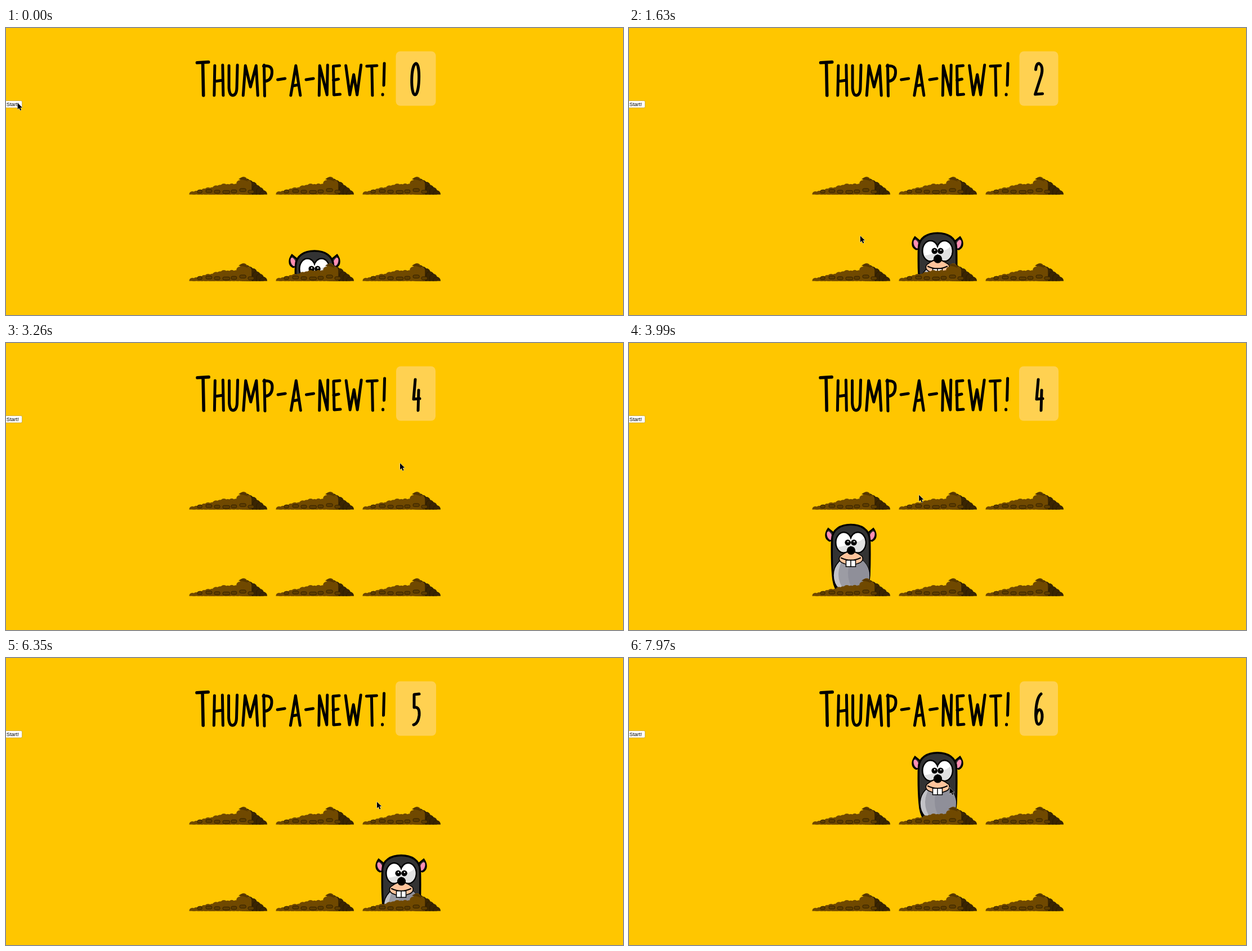
Animation, 1096 px wide and 511 px high, one loop 8 s. Source, as an HTML page:

```html
<!DOCTYPE html>
<html lang="en">
<head>
<meta charset="utf-8">
<title>Thump-a-newt!</title>
<style>
  html, body { margin: 0; width: 100%; height: 100%; overflow: hidden; background: #ffc600; }
  svg { display: block; width: 100%; height: 100%; }
  .lettering { fill: none; stroke: #000; stroke-width: 5; stroke-linecap: round; stroke-linejoin: round; }
  .button { font: 9.3px "Liberation Sans", Arial, sans-serif; }
</style>
</head>
<body>
<svg viewBox="0 0 1096 511">
  <defs>
    <clipPath id="hole"><rect x="-77" y="-34" width="154" height="154"/></clipPath>
    <clipPath id="ground"><rect x="-70" y="-40" width="140" height="40"/></clipPath>
    <clipPath id="belly"><ellipse cx="1" cy="92" rx="32" ry="34"/></clipPath>
    <clipPath id="eyes"><use href="#eye"/><use href="#eye" x="25"/></clipPath>

    <ellipse id="eye" cx="-12.5" cy="33.5" rx="13" ry="17"/>
    <g id="ear">
      <path d="M-40 9C-45 16 -47 26 -38 30.5C-34 31 -32 25 -29 18Z" fill="#333" stroke="#000" stroke-width="3"/>
      <ellipse cx="-37.8" cy="21.5" rx="4" ry="8" transform="rotate(-22 -37.8 21.5)" fill="#ff8fb3"/>
    </g>
    <g id="mole">
      <use href="#ear"/>
      <use href="#ear" transform="scale(-1 1)"/>
      <path d="M-20 123C-28 117 -31 107 -32 92C-34 70 -34 48 -33.5 28C-33 10 -18 1.7 0 1.7C18 1.7 33 10 33.5 28C34 48 34 70 33 92C32 107 29 117 22 123Z" fill="#333" stroke="#000" stroke-width="3.4"/>
      <ellipse cx="1" cy="92" rx="32" ry="34" fill="#c2c2c7" stroke="#000" stroke-width="1.5"/>
      <g clip-path="url(#belly)">
        <ellipse cx="14" cy="90" rx="36" ry="40" fill="#9c9ca4"/>
        <ellipse cx="30" cy="88" rx="35" ry="44" fill="#8f8f99"/>
      </g>
      <g stroke="#000" stroke-width="5"><use href="#eye"/><use href="#eye" x="25"/></g>
      <g clip-path="url(#eyes)">
        <rect x="-27" y="15" width="54" height="38" fill="#fff"/>
        <path d="M-27 42Q-8 40 0 34Q20 34 27 20V54H-27Z" fill="#e2e2e2"/>
      </g>
      <circle cx="-5.3" cy="33.5" r="5.3"/><circle cx="5.5" cy="33.5" r="5.3"/>
      <g fill="#fff"><circle cx="-5" cy="32" r="1.2"/><circle cx="6" cy="32" r="1.2"/></g>
      <path d="M0 49C-10 50 -13 54 -19 58C-23 64 -19 69 -12 71Q0 77 12 71C20 69 23 64 20 58C14 54 10 50 0 49Z" fill="#ffc49c" stroke="#000" stroke-width="1.5"/>
      <path d="M-17 61Q0 69 17 61" fill="none" stroke="#000" stroke-width="2.2" stroke-linecap="round"/>
      <path d="M-8.5 65H0V76.5H-8.5ZM0 65H8.5V76.5H0Z" fill="#fff" stroke="#000" stroke-width="1.5"/>
      <circle cx=".5" cy="47.8" r="7.6"/>
    </g>
    <g id="dirt" clip-path="url(#ground)"></g>
  </defs>

  <rect width="1096" height="511" fill="#ffc600"/>
  <g id="title" class="lettering" role="img" aria-label="Thump-a-newt!"></g>
  <rect id="box" y="41.5" height="97" rx="8" fill="#ffd151"/>
  <path id="digit" class="lettering"/>
  <rect x="-4" y="129.5" width="32.5" height="12.5" rx="2" fill="#fff" stroke="#b89a3a" stroke-width=".7"/>
  <text class="button" x=".8" y="139">Start!</text>
  <g id="holes"></g>
  <path id="cursor" d="M0 0V11.5L2.7 9L4.6 13.4L6.6 12.5L4.7 8.2H8.3Z" stroke="#fff" paint-order="stroke"/>
</svg>
<script>
const LOOP = 8000, STEP = 147.5, SLIDE = 400, REACTION = 100, REACH = 444;
const PITCH = 154, BASELINE = 120;
const $ = id => document.getElementById(id);

function add(parent, tag, attrs) {
  const el = document.createElementNS('http://www.w3.org/2000/svg', tag);
  for (const key in attrs) el.setAttribute(key, attrs[key]);
  return parent.appendChild(el);
}

// Hand lettering: width and pen strokes above the baseline
const glyphs = {
  T: [18, 'M0 -52L18 -53M9 -52L10 0'],
  H: [16, 'M1 -53L0 0M15 -54L16 0M1 -25L15 -27'],
  U: [15, 'M0 -53V-13Q1 0 7 0Q14 -1 14 -15L15 -54'],
  M: [26, 'M0 0L4 -53L13 -15L23 -53L26 0'],
  P: [15, 'M1 -54L2 1M0 -52Q16 -55 15 -40Q14 -26 2 -25'],
  '-': [13, 'M0 -28L13 -30'],
  A: [17, 'M0 0L9 -53L17 0M4 -17L14 -19'],
  N: [15, 'M0 0L1 -53L14 -1L15 -54'],
  E: [12, 'M11 -53L0 -52L1 -1L12 -2M0 -27L9 -29'],
  W: [27, 'M0 -53L7 -1L14 -37L20 -1L27 -54'],
  '!': [3, 'M3 -57L2 -18M0 -2V-1'],
  0: [15, 'M8 -57C-2 -55 -2 -1 6 -1S16 -54 8 -57Z'],
  1: [10, 'M1 -55L6 -57L7 0M1 0H11'],
  2: [13, 'M1 -46Q2 -57 7 -57Q15 -52 11 -36L0 -2L13 -3'],
  3: [16, 'M3 -55L13 -56L7 -33Q15 -30 14 -16Q12 -2 4 -1'],
  4: [14, 'M6 -55L3 -20L14 -21M12 -36L11 0'],
  5: [16, 'M14 -56L5 -55V-32Q15 -34 14 -18Q12 -3 4 -1'],
  6: [12, 'M10 -56C-1 -48 -2 -2 5 -2C14 -2 14 -28 7 -28C3 -27 0 -18 1 -12']
};

let pen = 339;
[...'THUMP-A-NEWT!'].forEach((char, i) => {
  const [width, d] = glyphs[char], scale = i ? 1 : 1.12;
  add($('title'), 'path', { d, transform: `translate(${pen} ${BASELINE}) scale(${scale})` });
  pen += width * scale + 10.2;
});

let seed = 7;
const random = () => (seed = seed * 16807 % 2147483647) / 2147483647;

// Round-topped columns of soil under a skyline
function clumps(from, to, gap, skyline, paint) {
  for (let x = from; x <= to; x += gap) {
    const h = skyline(x) + random() * 2 - 1, r = Math.min(h, 5 + random() * 2.5);
    add($('dirt'), 'rect', { x: x - r, y: -h, width: 2 * r, height: h + r, rx: r, ...paint });
  }
}
clumps(33, 64, 6, x => 30 - 26 * ((x - 30) / 36) ** 1.3, { fill: '#3a2502', stroke: '#241700', 'stroke-width': .7 });
clumps(-63, 36, 7, x => Math.min(19, 5 + .24 * (x + 64)) + 12 * Math.exp(-(((x - 28) / 9) ** 2)), { fill: '#704900' });
for (let x = -54; x < 40; x += 15) {
  const width = 8 + random() * 5;
  add($('dirt'), 'rect', { x, y: -7 - random() * 4, width, height: 5.5, rx: 2.5, fill: '#5e3d00', stroke: '#2e1d00', 'stroke-width': .9 });
}
add($('dirt'), 'path', { d: 'M19 -27Q24 -33 32 -29L36 -23Q29 -27 19 -27Z', fill: '#553600' });

// Holes 0-2 are the top row, 3-5 the bottom row
const moles = Array.from({ length: 6 }, (_, i) => {
  const hole = add($('holes'), 'g', { transform: `translate(${394 + i % 3 * PITCH} ${167 + (i / 3 | 0) * PITCH})` });
  const view = add(hole, 'g', { 'clip-path': 'url(#hole)' });
  const mole = add(view, 'use', { href: '#mole' });
  add(hole, 'use', { href: '#dirt', y: 129.5 });
  return mole;
});

// Each mole comes up, the cursor runs to its aim, and the mole drops, hit or not
const peeps = [
  { hole: 4, up: -121, down: 560, aim: [578, 353], hit: 1 },
  { hole: 3, up: 668, down: 1400, aim: [400, 372], hit: 1 },
  { hole: 4, up: 1450, down: 1950, aim: [552, 345], hit: 1 },
  { hole: 2, up: 2090, down: 2900, aim: [700, 214], hit: 1 },
  { hole: 3, up: 3618, down: 4190, aim: [412, 302] },
  { hole: 2, up: 4190, down: 4980, aim: [600, 225] },
  { hole: 1, up: 4980, down: 5340, aim: [523, 219] },
  { hole: 2, up: 5340, down: 6060, aim: [662, 235], hit: 1 },
  { hole: 5, up: 6138, down: 6720, aim: [640, 385] },
  { hole: 4, up: 6720, down: 7400, aim: [560, 360], hit: 1 },
  { hole: 1, up: 7480, down: 9000, aim: [570, 224] }
];

// The CSS "ease" curve
function ease(x) {
  if (x <= 0) return 0;
  if (x >= 1) return 1;
  let lo = 0, hi = 1, s;
  for (let i = 0; i < 20; i++) {
    s = (lo + hi) / 2;
    const bx = .75 * s * (1 - s) + s ** 3;
    if (bx < x) lo = s; else hi = s;
  }
  return .3 * s * (1 - s) ** 2 + 3 * s * s * (1 - s) + s ** 3;
}

function smooth(x) {
  const k = Math.min(1, Math.max(0, x));
  return k * k * (3 - 2 * k);
}

function draw(t) {
  const height = Array(6).fill(0);
  let score = 0, cursor = [17, 132];
  for (const { hole, up, down, aim, hit } of peeps) {
    const h = ease((t - up) / SLIDE) * (1 - ease((t - down) / SLIDE));
    height[hole] = Math.max(height[hole], h);
    if (hit && t >= down) score++;
    const k = smooth((t - up - REACTION) / REACH);
    cursor = cursor.map((from, i) => from + (aim[i] - from) * k);
  }
  moles.forEach((mole, i) => mole.setAttribute('y', PITCH * (1 - height[i])));

  const [width, d] = glyphs[score], boxWidth = width + 56;
  $('digit').setAttribute('d', d);
  $('digit').setAttribute('transform', `translate(${728 - width / 2} ${BASELINE})`);
  $('box').setAttribute('x', 728 - boxWidth / 2);
  $('box').setAttribute('width', boxWidth);
  $('title').setAttribute('transform', `translate(${(72 - boxWidth) / 2} 0)`);
  $('cursor').setAttribute('transform', `translate(${cursor})`);
}

const start = performance.now();
function tick() {
  const t = (performance.now() - start) % LOOP;
  draw(Math.floor((t + 2) / STEP) * STEP);
  requestAnimationFrame(tick);
}
tick();
</script>
</body>
</html>
```
